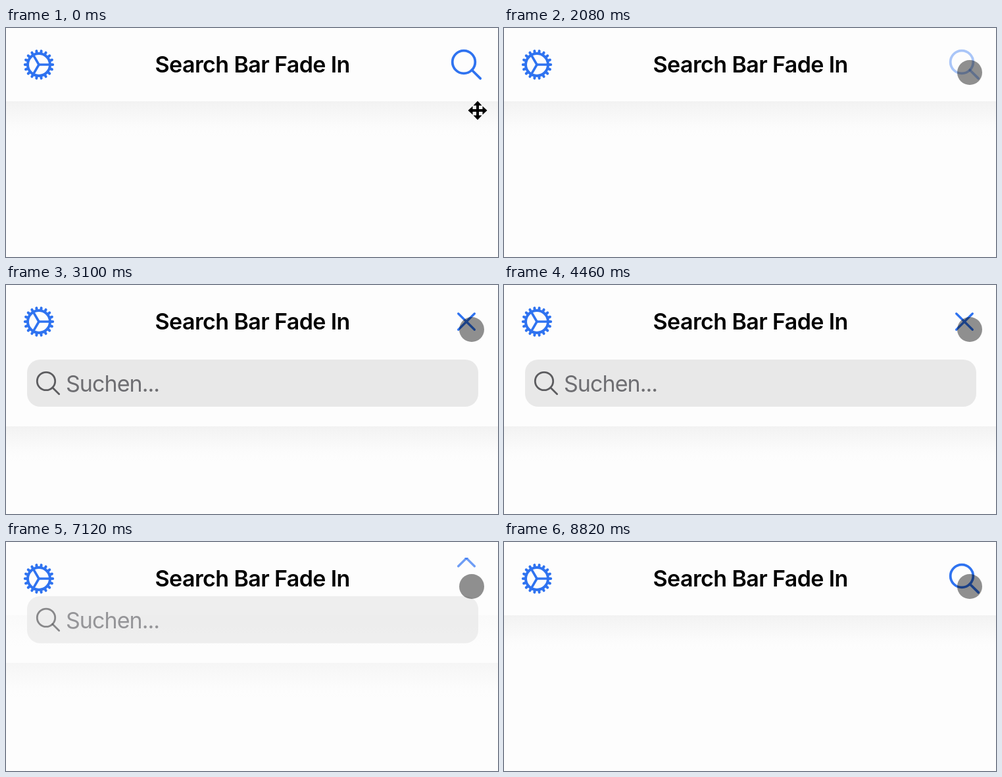
Recreate the animation shown at these times as an HTML page with a canvas. Size 748 by 350 pixels, loop 8840 ms.

```html
<!DOCTYPE html>
<html lang="en">
<head>
<meta charset="utf-8">
<title>Search Bar Fade In</title>
<style>
  html, body { margin: 0; width: 100%; height: 100%; overflow: hidden; background: #fdfdfd; }
  canvas { display: block; width: 748px; height: 350px; }
</style>
</head>
<body>
<canvas id="stage" width="748" height="350"></canvas>
<script>
const W = 748, H = 350, LOOP = 8840, TAU = Math.PI * 2;
const ctx = document.getElementById('stage').getContext('2d');
const BG = '#fdfdfd', BLUE = '#2f73f0', GRAY = '#5c5c5f', BAR = '#e8e8e8';
const FONT = 'Inter, "Liberation Sans", sans-serif';

const clamp = x => Math.min(1, Math.max(0, x));
const ramp = (n, from, to) => clamp((n - from) / (to - from));
const mix = (a, b, p) => a + (b - a) * p;
const smooth = x => x * x * (3 - 2 * x);

// The screen refreshes unevenly: steps of 20, 100 and 20 ms.
function stepAt(ms) {
  const rest = ms % 140;
  return 3 * Math.floor(ms / 140) + (rest < 20 ? 0 : rest < 120 ? 1 : 2);
}

function withAlpha(alpha, draw) {
  if (alpha <= 0) return;
  ctx.save();
  ctx.globalAlpha = alpha;
  draw();
  ctx.restore();
}

function pen(color, width) {
  ctx.strokeStyle = color;
  ctx.lineWidth = width;
  ctx.lineCap = 'round';
}

function line(x1, y1, x2, y2) {
  ctx.beginPath();
  ctx.moveTo(x1, y1);
  ctx.lineTo(x2, y2);
  ctx.stroke();
}

function ring(x, y, r) {
  ctx.beginPath();
  ctx.arc(x, y, r, 0, TAU);
  ctx.stroke();
}

function text(str, x, y, weight, color, align, spacing) {
  ctx.font = `${weight} 34px ${FONT}`;
  ctx.letterSpacing = spacing + 'px';
  ctx.textAlign = align;
  ctx.fillStyle = color;
  ctx.fillText(str, x, y);
}

function shadow(y) {
  const g = ctx.createLinearGradient(0, y, 0, y + 56);
  g.addColorStop(0, 'rgba(242,242,242,1)');
  g.addColorStop(0.45, 'rgba(247,247,247,0.8)');
  g.addColorStop(1, 'rgba(253,253,253,0)');
  ctx.fillStyle = g;
  ctx.fillRect(0, y, W, 56);
}

function gear(x, y) {
  ctx.save();
  ctx.translate(x, y);
  pen(BLUE, 4);
  ring(0, 0, 17);
  for (let i = 0; i < 18; i++) {
    const a = i * TAU / 18, c = Math.cos(a), s = Math.sin(a);
    line(c * 18, s * 18, c * 21.2, s * 21.2);
  }
  pen(BLUE, 3.6);
  for (let i = 0; i < 3; i++) {
    const a = i * TAU / 3;
    line(0, 0, Math.cos(a) * 17, Math.sin(a) * 17);
  }
  ctx.restore();
}

function lens(x, y, r, tip, color, width) {
  pen(color, width);
  ring(x, y, r);
  const d = r * Math.SQRT1_2;
  line(x + d, y + d, x + tip, y + tip);
}

function cross(x, y) {
  pen(BLUE, 3.4);
  line(x - 12.3, y - 12.3, x + 12.3, y + 12.3);
  line(x - 12.3, y + 12.3, x + 12.3, y - 12.3);
}

function searchBar(dy) {
  ctx.fillStyle = BAR;
  ctx.beginPath();
  ctx.roundRect(32, 114 + dy, 686, 72, 20);
  ctx.fill();
  lens(61, 147 + dy, 13.7, 19.7, GRAY, 2.8);
  text('Suchen...', 91, 163 + dy, 400, '#6e6e72', 'left', -0.95);
}

function moveCursor(x, y) {
  ctx.save();
  ctx.translate(x, y);
  ctx.fillStyle = '#000';
  for (let i = 0; i < 4; i++) {
    ctx.fillRect(-2, -11, 4, 11);
    ctx.beginPath();
    ctx.moveTo(0, -14.5);
    ctx.lineTo(6.5, -7.5);
    ctx.lineTo(-6.5, -7.5);
    ctx.fill();
    ctx.rotate(TAU / 4);
  }
  ctx.restore();
}

function touch(x, y) {
  ctx.save();
  ctx.globalCompositeOperation = 'multiply';
  ctx.fillStyle = '#909090';
  ctx.beginPath();
  ctx.arc(x, y, 19, 0, TAU);
  ctx.fill();
  ctx.restore();
}

function render(n) {
  const open = smooth(ramp(n, 56, 67)) - smooth(ramp(n, 148, 159));
  const lensAlpha = n < 100 ? 1 - ramp(n, 41, 46) : ramp(n, 160, 167);
  const dy = -104 * (1 - open);

  ctx.fillStyle = BG;
  ctx.fillRect(0, 0, W, H);
  withAlpha(1 - open, () => shadow(112));
  withAlpha(open, () => shadow(216 + dy));

  gear(50, 56);
  text('Search Bar Fade In', 374.7, 68, 600, '#000', 'center', -0.6);
  withAlpha(lensAlpha, () => lens(696, 52, 17.3, 25.2, BLUE, 3.8));

  withAlpha(open, () => {
    ctx.beginPath();
    ctx.rect(0, 24, W, H - 24);
    ctx.clip();
    searchBar(dy);
    cross(700, 56 + dy);
  });

  const glide = smooth(ramp(n, 4, 16));
  const x = mix(717, 708, glide), y = mix(126, 68, glide);
  if (n < 6) moveCursor(x, y);
  else touch(x, y);
}

const start = performance.now();
function tick() {
  render(stepAt((performance.now() - start) % LOOP));
  requestAnimationFrame(tick);
}
tick();
</script>
</body>
</html>
```
